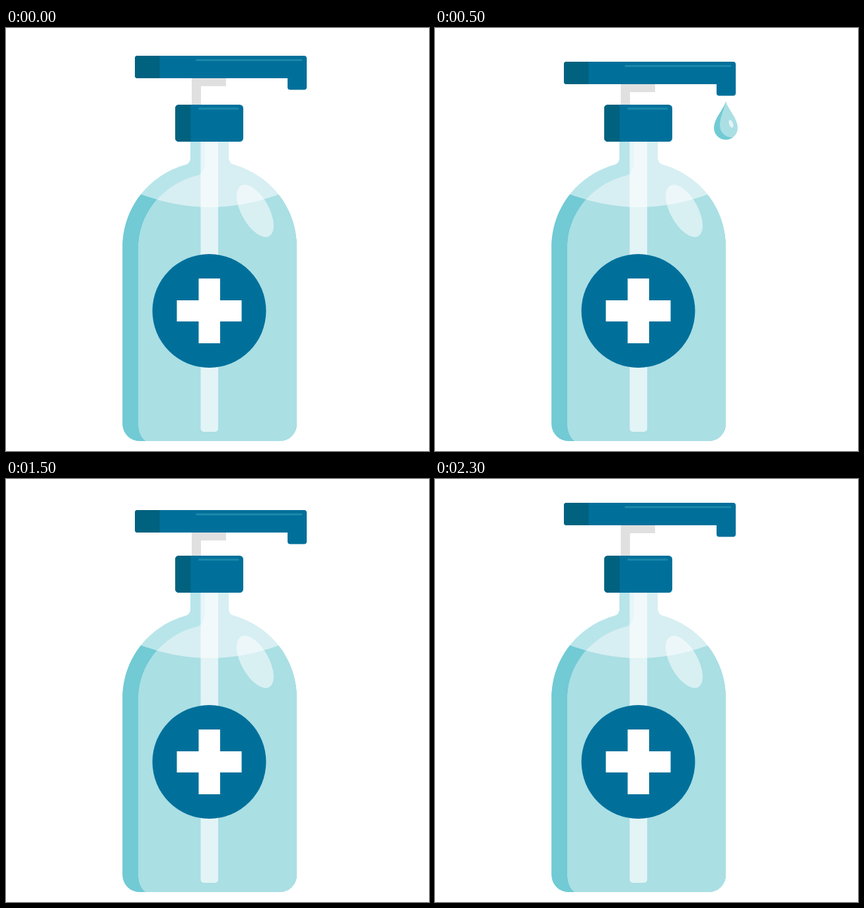
An HTML page for the animation above (2.5 s loop, 640 by 640 pixels).

```html
<!DOCTYPE html>
<html lang="en">
<head>
<meta charset="utf-8">
<title>Soap dispenser</title>
<style>
  html, body { margin: 0; width: 100%; height: 100%; overflow: hidden; background: #fff; }
  svg { display: block; width: 100vw; height: 100vh; }
  .blue { fill: #00709b; }
  .navy { fill: #00627f; }
  .shine { stroke: #1c87a9; stroke-width: 3; stroke-linecap: round; }
  .deep { fill: #71cad4; }
  .gel { fill: #aadfe4; }
</style>
</head>
<body>
<svg viewBox="0 0 640 640">
  <defs>
    <clipPath id="bottle">
      <path d="M279 165V196C279 202 276 206 271 207C216 223 176.300 272 176.300 332V599A26 26 0 0 0 202.300 625H414A26 26 0 0 0 440 599V332C440 272 400 223 345 207C340 206 337 202 337 196V165Z"/>
    </clipPath>
    <clipPath id="front">
      <path d="M301 165V200C301 214 297 221 290 223C238 235 200.500 281 200.500 332V599C200.500 610 204 620 212 625H450V165Z"/>
    </clipPath>
    <clipPath id="cap"><rect x="256" y="116" width="103" height="56" rx="5.500"/></clipPath>
    <clipPath id="head">
      <path d="M199 42H451Q455 42 455 46V89.500Q455 93.500 451 93.500H430Q426 93.500 426 89.500V76H199Q195 76 195 72V46Q195 42 199 42Z"/>
    </clipPath>
    <clipPath id="tear">
      <path d="M440 111C436 124 422 137 422 151A18 18 0 0 0 458 151C458 137 444 124 440 111Z"/>
    </clipPath>
    <path id="liquid" d="M170 236L205 252Q308 290 412 252L450 236V630H170Z"/>
  </defs>

  <g clip-path="url(#bottle)">
    <path fill="#b8e5ea" d="M170 165H450V630H170Z"/>
    <use href="#liquid" class="deep"/>
    <g clip-path="url(#front)">
      <path fill="#d7eff2" d="M170 165H450V630H170Z"/>
      <use href="#liquid" class="gel"/>
    </g>
    <rect x="294.500" y="160" width="26.500" height="451" rx="5" fill="#fff" opacity=".67"/>
    <ellipse rx="20.800" ry="43.700" transform="translate(377 276.700) rotate(-29)" fill="#fff" opacity=".55"/>
  </g>

  <circle class="blue" cx="307.500" cy="428" r="86"/>
  <path fill="#fff" d="M291.500 379H324V412H356.500V444H324V477H291.500V444H258.500V412H291.500Z"/>

  <g id="pump">
    <path fill="#e0e0e0" d="M281 74H333V88H295V128H281Z"/>
    <g clip-path="url(#head)">
      <path class="blue" d="M195 42H455V94H195Z"/>
      <path class="navy" d="M195 42H232.500V76H195Z"/>
    </g>
    <path class="shine" d="M288.500 48.500H447"/>
  </g>

  <g clip-path="url(#cap)">
    <path class="blue" d="M256 116H359V172H256Z"/>
    <path class="navy" d="M256 116H279.500V172H256Z"/>
  </g>
  <path class="shine" d="M292.500 122H351"/>

  <g id="drop" clip-path="url(#tear)">
    <path class="deep" d="M420 110H460V170H420Z"/>
    <path class="gel" d="M440 109C438 124 431 134 431 147C431 159 440 166 451 165.500L462 160V109Z"/>
    <ellipse rx="3" ry="6" transform="translate(448 145) rotate(-20)" fill="#e3f4f7"/>
  </g>
</svg>
<script>
  // One entry per 500 ms step: pump shift, drop shift (null = no drop)
  const steps = [[0, null], [9, 0], [19, 25], [5, null], [-6, null]];

  function play(id, toFrame) {
    const frames = [...steps, steps[0]].map((step, i) => ({
      ...toFrame(step), offset: i / steps.length, easing: 'steps(1, end)'
    }));
    const anim = document.getElementById(id).animate(frames, { duration: 2500, iterations: Infinity });
    anim.startTime = 0;
  }

  const shift = y => `translateY(${y}px)`;
  play('pump', ([y]) => ({ transform: shift(y) }));
  play('drop', ([, y]) => ({ transform: shift(y ?? 0), opacity: y === null ? 0 : 1 }));
</script>
</body>
</html>
```
